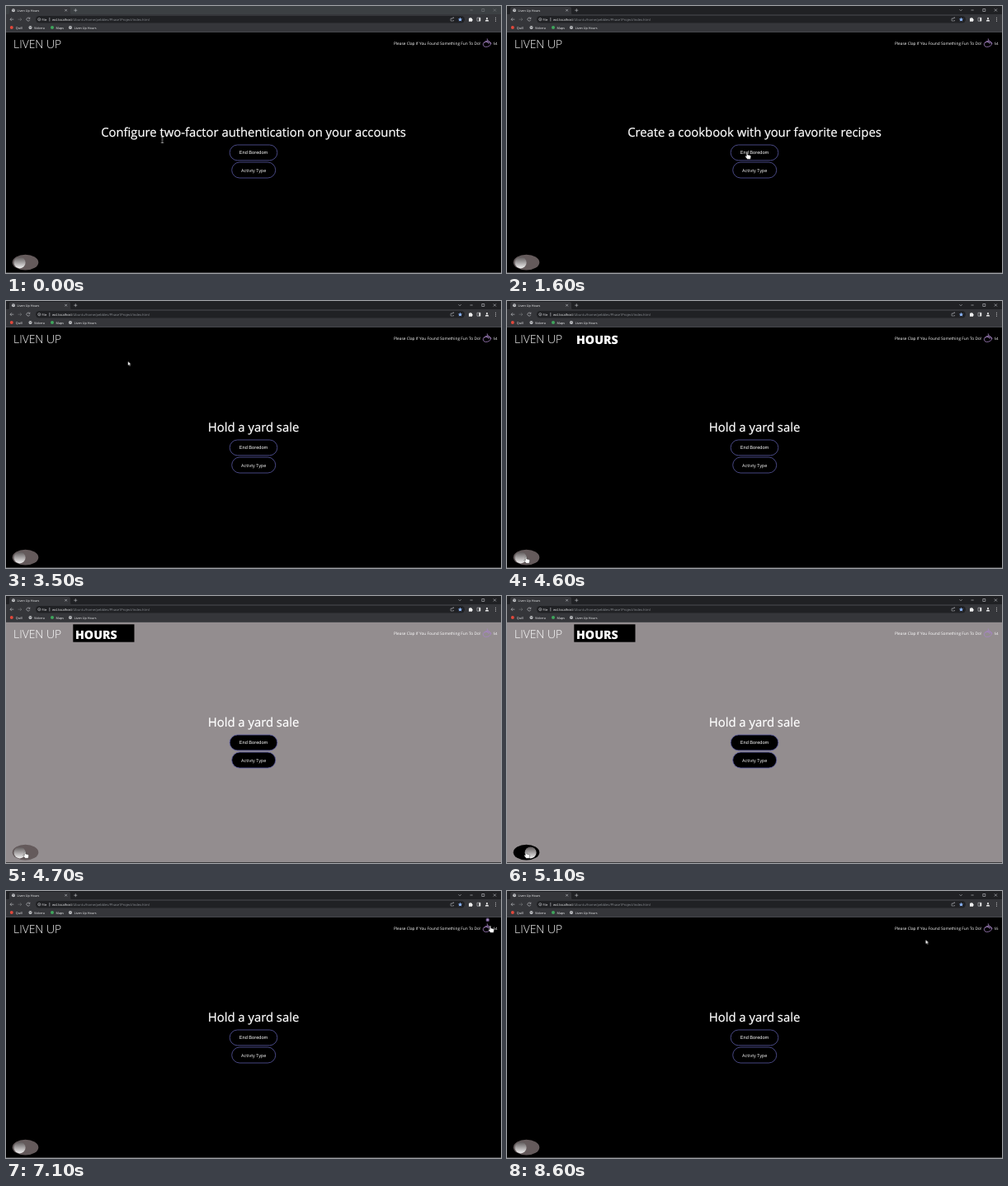
Animation of 600x323 px, one loop 8800 ms. Source, as an HTML page:

```html
<!DOCTYPE html>
<html lang="en">
<head>
<meta charset="utf-8">
<title>Liven Up Hours</title>
<style>
html, body { margin: 0; width: 100%; height: 100%; overflow: hidden; background: #000; }
svg { display: block; width: 100vw; height: 100vh; font-family: "Open Sans", "Noto Sans", sans-serif; text-rendering: geometricPrecision; }
text { fill: #fff; white-space: pre; }
.ui { font-size: 3.75px; }
.ui text { fill: #f0f1f3; }
.line { fill: none; stroke: #c4c7cc; stroke-width: .6; }
.idea { font-size: 14.84px; text-anchor: middle; stroke: #fff; stroke-width: .22; }
.btn rect { fill: #000; stroke: #5a5aa2; stroke-width: .8; }
.btn text { text-anchor: middle; font-size: 5.45px; }

/* one 8.8 s loop; 100 ms = 1.1364 % */
.a { animation: 8.8s step-end infinite; }
#page { animation-name: page; }
@keyframes page { 0%, 61.364% { fill: #000 } 53.409% { fill: #938d8f } }

/* the window gains focus on the first click */
#strip { animation-name: strip; }
#winbtns { animation-name: winbtns; }
#menu { animation-name: i0; }
@keyframes strip { 0% { fill: #3c4043 } 18.182%, 100% { fill: #202124 } }
@keyframes winbtns { 0% { opacity: .45 } 18.182%, 100% { opacity: 1 } }
@keyframes i0 { 0% { opacity: .2 } 18.182%, 100% { opacity: 1 } }

#i1 { animation-name: i1; }
#i2 { animation-name: i2; }
#i3 { animation-name: i3; }
#i4 { animation-name: i4; }
@keyframes i1 { 0% { opacity: 1 } 18.182%, 100% { opacity: 0 } }
@keyframes i2 { 0%, 28.409%, 100% { opacity: 0 } 18.182% { opacity: 1 } }
@keyframes i3 { 0%, 32.955%, 100% { opacity: 0 } 28.409% { opacity: 1 } }
@keyframes i4 { 0% { opacity: 0 } 32.955%, 100% { opacity: 1 } }

#word { animation-name: word; }
@keyframes word { 0%, 69.318%, 100% { opacity: 0 } 40.909% { opacity: 1 } }

#track { animation-name: track; }
@keyframes track {
  0%, 65.909%, 100% { fill: #645a5b }
  53.409% { fill: #645a5b; animation-timing-function: steps(4) }
  57.955% { fill: #000 }
  61.364% { fill: #000; animation-timing-function: steps(4) }
}
#knob { animation-name: knob; }
@keyframes knob {
  0%, 65.909%, 100% { transform: translateX(0) }
  53.409% { transform: translateX(0); animation-timing-function: steps(4) }
  57.955% { transform: translateX(12px) }
  61.364% { transform: translateX(12px); animation-timing-function: steps(4) }
}

#c54 { animation-name: c54; }
#c55 { animation-name: c55; }
@keyframes c54 { 0% { opacity: 1 } 86.364%, 100% { opacity: 0 } }
@keyframes c55 { 0% { opacity: 0 } 86.364%, 100% { opacity: 1 } }

#puff { animation-name: puff; }
@keyframes puff {
  0%, 86.364%, 100% { opacity: 0; transform: translateY(0) }
  76.136% { opacity: 1; transform: translateY(0); animation-timing-function: steps(4) }
  80.682% { opacity: 1; transform: translateY(-8.5px); animation-timing-function: steps(4) }
  85.227% { opacity: 0; transform: translateY(-11px) }
}

#cursor { animation-name: move; }
@keyframes move {
  0% { transform: translate(189.5px, 162px) }
  1.136% { transform: translate(189.5px, 162px); animation-timing-function: steps(5, start) }
  6.818% { transform: translate(291px, 177px) }
  35.227% { transform: translate(291px, 177px); animation-timing-function: steps(5) }
  40.909% { transform: translate(112px, 47px); animation-timing-function: steps(4) }
  45.455% { transform: translate(69px, 285px); animation-timing-function: steps(3) }
  48.864% { transform: translate(23px, 309px) }
  61.364% { transform: translate(26px, 305px) }
  63.636% { transform: translate(26px, 305px); animation-timing-function: steps(5) }
  69.318% { transform: translate(112px, 47px) }
  70.455% { transform: translate(112px, 47px); animation-timing-function: steps(3) }
  73.864% { transform: translate(587px, 42px) }
  87.5% { transform: translate(587px, 42px); animation-timing-function: steps(6) }
  94.318%, 100% { transform: translate(507.5px, 59px) }
}
#beam { animation-name: beam; }
#hand { animation-name: hand; }
#arrow { animation-name: arrow; }
@keyframes beam { 0% { opacity: 1 } 4.545%, 100% { opacity: 0 } }
@keyframes hand {
  0%, 36.364%, 64.773%, 88.636%, 100% { opacity: 0 }
  4.545%, 47.727%, 73.864% { opacity: 1 }
}
@keyframes arrow {
  0%, 4.545%, 47.727%, 73.864% { opacity: 0 }
  36.364%, 64.773%, 88.636%, 100% { opacity: 1 }
}
</style>
</head>
<body>
<svg viewBox="0 0 600 323" preserveAspectRatio="none">
  <defs>
    <linearGradient id="shine" x1="0" y1="0" x2="0" y2="1">
      <stop offset="0" stop-color="#5c5758"/>
      <stop offset="1" stop-color="#f1f0f0"/>
    </linearGradient>
    <g id="globe">
      <circle r="2" fill="#d5d7da"/>
      <path d="M-1.5-.8 .2-.2-.4 1.2M.5-1.5 1.4.3" fill="none" stroke="#4a4c50" stroke-width=".6"/>
    </g>
  </defs>

  <rect id="page" class="a" width="600" height="323"/>
  <rect y="322" width="600" height="1" fill="#3c3c3e"/>

  <!-- browser bars -->
  <g class="ui">
    <rect id="strip" class="a" width="600" height="11"/>
    <rect y="10" width="600" height="22" fill="#35363a"/>
    <rect y="31" width="600" height="1" fill="#45474b"/>
    <path d="M2 10.5Q4 10.5 4 8V3Q4 1 6 1H76Q78 1 78 3V8Q78 10.5 80 10.5Z" fill="#35363a"/>
    <use href="#globe" x="9" y="5.2"/>
    <text x="13.5" y="6.6">Liven Up Hours</text>
    <path class="line" d="M71.3 3.9l2.6 2.6m0-2.6l-2.6 2.6M82.3 5.2h4m-2-2v4"/>
    <g id="winbtns" class="a">
      <path id="menu" class="line a" d="M548.5 4.2l1.6 1.6 1.6-1.6"/>
      <path class="line" d="M562.5 5h3.2M576.8 3.5h3v3h-3zM590.8 3.4l3.2 3.2m0-3.2l-3.2 3.2"/>
    </g>

    <path class="line" d="M9.3 16.2H5m1.9-1.9L5 16.2l1.9 1.9"/>
    <path class="line" d="M14.5 16.2h4.3m-1.9-1.9l1.9 1.9-1.9 1.9" opacity=".45"/>
    <path class="line" d="M28.6 15a2 2 0 1 0 .2 1.8M28.9 13.7v1.6h-1.6"/>
    <rect x="36" y="12" width="520" height="8.4" rx="4.2" fill="#202124"/>
    <circle class="line" cx="40.3" cy="16.2" r="1.6"/>
    <path class="line" d="M40.3 15.9v1.2M52.8 14v4.5"/>
    <text x="43.5" y="17.6">File</text>
    <text x="56" y="17.6" font-size="4.02">wsl.localhost<tspan fill="#8c9095">/Ubuntu/home/pebbles/Phase1Project/index.html</tspan></text>
    <path class="line" d="M541 15h-2v3h3.5v-1m-2-1.2q.3-1.6 2.3-1.6m-1-1l1 1-1 1" opacity=".8"/>
    <path d="M550.5 13.7l.8 1.7 1.8.2-1.3 1.2.4 1.8-1.7-.9-1.7.9.4-1.8-1.3-1.2 1.8-.2z" fill="#8ab4f8"/>
    <path d="M561 14.8h1.2a.8.8 0 0 1 1.6 0h1.2v1.3a.8.8 0 0 1 0 1.6v1h-4z" fill="#eee"/>
    <path class="line" d="M571 14.2h4v4h-4z"/>
    <path d="M573.3 14.2h1.7v4h-1.7z" fill="#eee"/>
    <circle cx="583" cy="15" r="1.1" fill="#eee"/>
    <path d="M580.8 18.6q0-2 2.2-2t2.2 2z" fill="#eee"/>
    <path d="M593.5 13.8v.9m0 1.1v.9m0 1.1v.9" stroke="#ddd" stroke-width=".9"/>

    <circle cx="6.8" cy="26" r="2" fill="#e0483c"/>
    <text x="11.8" y="27.5">Quill</text>
    <use href="#globe" x="29.5" y="26"/>
    <text x="34" y="27.5">Vidorra</text>
    <circle cx="56" cy="26" r="2" fill="#3fa65b"/>
    <text x="60.5" y="27.5">Maps</text>
    <use href="#globe" x="78" y="26"/>
    <text x="82.7" y="27.5">Liven Up Hours</text>
  </g>

  <!-- header -->
  <text x="9" y="51.2" font-size="13.9" font-weight="300">LIVEN UP</text>
  <rect x="81.3" y="34.3" width="74.2" height="21.4"/>
  <text id="word" class="a" x="84" y="51.6" font-size="14.2" font-weight="800">HOURS</text>
  <text x="470" y="46.8" font-size="4.8">Please Clap If You Found Something Fun To Do!</text>
  <g fill="none" stroke="#a684c4" stroke-width=".75" stroke-linejoin="round" stroke-linecap="round">
    <ellipse cx="583" cy="46" rx="4.7" ry="3.3" transform="rotate(-12 583 46)"/>
    <path d="M579.6 44.6q2-2 3.4-1.2l2.6 1.6M581.8 42.6l3.6 2.4M583 41.2l3.6 2.4 1 1.4M583.4 39.8l.4 1"/>
  </g>
  <g id="puff" class="a">
    <circle cx="583.8" cy="43.4" r="2.2" fill="#6f5590"/>
    <path d="M582.6 43.4h2.4m-1.2-1.2v2.4" stroke="#eadcff" stroke-width=".5"/>
  </g>
  <g font-size="4.4">
    <text id="c54" class="a" x="590.5" y="46.8">54</text>
    <text id="c55" class="a" x="590.5" y="46.8">55</text>
  </g>

  <!-- activity -->
  <g class="idea">
    <text id="i1" class="a" x="300" y="158.4">Configure two-factor authentication on your accounts</text>
    <text id="i2" class="a" x="300" y="158.4">Create a cookbook with your favorite recipes</text>
    <text id="i3" class="a" x="300" y="158.4">Plan a trip to another country</text>
    <text id="i4" class="a" x="300" y="158.4">Hold a yard sale</text>
  </g>
  <g class="btn">
    <rect x="271.2" y="168" width="57.6" height="18.8" rx="9.4"/>
    <text x="300" y="179.2" style="font: 5.65px 'Liberation Sans', Arial, sans-serif">End Boredom</text>
    <rect x="273.7" y="189" width="53" height="19" rx="9.5"/>
    <text x="300.2" y="200.5">Activty Type</text>
  </g>

  <!-- theme switch -->
  <ellipse id="track" class="a" cx="23.5" cy="310.2" rx="15.8" ry="9.4"/>
  <circle id="knob" class="a" cx="16.6" cy="310.4" r="7" fill="url(#shine)"/>

  <g id="cursor" class="a">
    <path id="beam" class="a" d="M-1.4-3.5h2.8M0-3.5v7M-1.4 3.5h2.8" fill="none" stroke="#ddd" stroke-width=".7"/>
    <path id="hand" class="a" d="M-.7.5q.7-1 1.4 0V3l3 .7q1 .3.9 1.5L4 8.3H.2L-2.1 5.2q-.2-1 .6-.9l.8.8z" fill="#fff" stroke="#222" stroke-width=".4"/>
    <path id="arrow" class="a" d="M0 0V5L1.2 4 2 5.7 2.9 5.3 2.1 3.6H3.6Z" fill="#fff" stroke="#222" stroke-width=".3"/>
  </g>
</svg>
</body>
</html>
```
